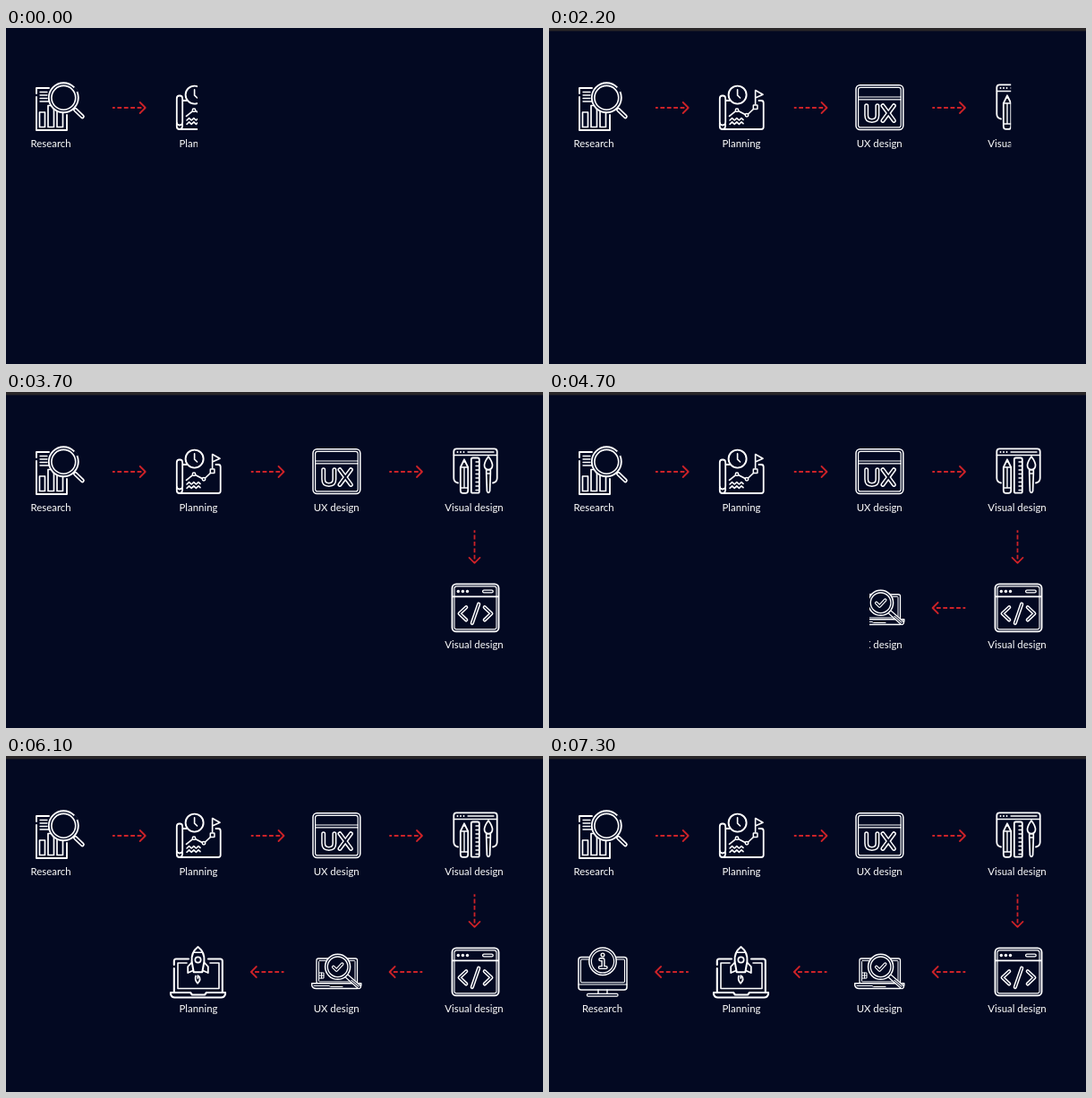
An HTML page with a canvas that plays this animation: 600x375 px, repeating every 8000 ms.

```html
<!DOCTYPE html>
<html lang="en">
<head>
<meta charset="utf-8">
<title>Design process</title>
<style>
  html, body { margin: 0; width: 100%; height: 100%; overflow: hidden; background: #030922; }
  canvas { display: block; width: 600px; height: 375px; }
</style>
</head>
<body>
<canvas id="stage"></canvas>
<script>
const W = 600, H = 375, LOOP = 8000;
const NAVY = '#030922', RED = '#cc2228', WHITE = '#fff';
const canvas = document.getElementById('stage');
const ctx = canvas.getContext('2d');
const dpr = window.devicePixelRatio || 1;
canvas.width = W * dpr;
canvas.height = H * dpr;

// Drawing helpers; paths use SVG syntax in stage pixels.
function stroke(d, width = 1.7, color = WHITE) {
  ctx.strokeStyle = color;
  ctx.lineWidth = width;
  ctx.stroke(new Path2D(d));
}
function fill(d, color = NAVY) {
  ctx.fillStyle = color;
  ctx.fill(new Path2D(d));
}
function shape(d, width) {
  fill(d);
  stroke(d, width);
}
function hollow(d, outer, inner) {
  stroke(d, outer);
  stroke(d, inner, NAVY);
}
function box(x, y, w, h, r, width = 1.7) {
  ctx.beginPath();
  ctx.roundRect(x, y, w, h, r);
  ctx.fillStyle = NAVY;
  ctx.fill();
  ctx.strokeStyle = WHITE;
  ctx.lineWidth = width;
  ctx.stroke();
}
function ring(x, y, r, width = 1.7) {
  ctx.beginPath();
  ctx.arc(x, y, r, 0, Math.PI * 2);
  ctx.fillStyle = NAVY;
  ctx.fill();
  ctx.strokeStyle = WHITE;
  ctx.lineWidth = width;
  ctx.stroke();
}
function dot(x, y, r) {
  ctx.beginPath();
  ctx.arc(x, y, r, 0, Math.PI * 2);
  ctx.fillStyle = WHITE;
  ctx.fill();
}
function label(text, x, baseline) {
  ctx.font = '11.4px Lato, "Open Sans", sans-serif';
  ctx.textAlign = 'center';
  ctx.fillStyle = WHITE;
  ctx.fillText(text, x, baseline);
}
function arrow(x, y, turns) {
  ctx.save();
  ctx.translate(x, y);
  ctx.rotate(turns * Math.PI / 2);
  ctx.lineCap = 'butt';
  ctx.setLineDash([4.8, 2.6]);
  ctx.lineDashOffset = 2;
  stroke('M0 0H36.5', 1.8, RED);
  ctx.setLineDash([]);
  ctx.lineCap = 'round';
  stroke('M30.7 -6L36.7 0L30.7 6', 1.8, RED);
  ctx.restore();
}

function chartIcon() {
  stroke('M34 73V67H48M34 77V114H68V97', 1.9);
  stroke('M38 71.5H46M38 75H46M38 78.5H46M38 82H48', 1.3);
  box(37.5, 94, 6, 16.5, 0);
  box(47, 86.5, 6.5, 24, 0);
  box(57, 92, 6.5, 18.5, 0);
  hollow('M77.5 91.3L85.3 98.8', 5, 1.6);
  ring(64.3, 77.8, 16.5, 1.9);
  ring(64.3, 77.8, 13.4, 1.6);
  stroke('M77 67.3L78.8 70.1', 2.6, NAVY);
}

function planIcon() {
  stroke('M197 81H202M234.5 81H237Q239.7 81 239.7 83.5V110.5Q239.7 113 237 113H194', 1.8);
  box(190.8, 75.5, 6.4, 33, 3.2, 1.8);
  stroke('M190.8 106V110Q190.8 113 194 113Q197.2 113 197.2 108', 1.8);
  ring(210.6, 74.6, 10, 1.9);
  stroke('M210.6 68.8V75.2L213.6 78', 1.6);
  stroke('M201.5 98.3L210 91.7L221 97.5L230 89');
  ring(210, 91.7, 1.7, 1.5);
  ring(221, 97.3, 1.7, 1.5);
  box(228.3, 86, 4.6, 4.6, .5, 1.5);
  stroke('M230.6 85V69.5L239 74.3L230.6 78', 1.6);
  for (const y of [103, 107.3])
    stroke(`M202 ${y}l2.6 -2.4l2.6 2.4l2.6 -2.4l2.6 2.4l2.6 -2.4l2 1.8`, 1.6);
}

function uxIcon() {
  box(343, 63.7, 52.8, 49.8, 4.5, 1.5);
  box(345.6, 66.3, 47.6, 44.6, 2.5, 1.2);
  stroke('M345.6 77H393.2M345.6 79.8H393.2', 1.2);
  hollow('M354.7 86.7V97.5Q354.7 103.4 360.8 103.4Q366.9 103.4 366.9 97.5V86.7', 5, 2);
  hollow('M373 86.7L385.4 103.4M385.4 86.7L373 103.4', 5, 2);
}

function toolsIcon() {
  stroke('M505 101.5Q500.3 100.5 500.3 96V66.5Q500.3 63.4 503.5 63.4H545.5Q548.7 63.4 548.7 66.5V96Q548.7 100.5 544 101.5', 1.8);
  stroke('M500.5 70.5H548.5', 1.5);
  for (const x of [504.5, 508, 511.5]) dot(x, 67, 1);
  stroke('M516 67H545', 1.3);
  shape('M507.8 84L512 75.3L516.2 84V110Q516.2 112.8 513.5 112.8H510.5Q507.8 112.8 507.8 110Z', 1.8);
  stroke('M508 84H516M508 107H516M512 85V106M511 78H513', 1.4);
  box(519.8, 73.5, 9, 39.2, 1.8, 1.8);
  for (let y = 78; y < 111; y += 4.5) stroke(`M525 ${y}H528`, 1.4);
  shape('M539 72Q533.8 79 534.6 83Q535.3 86.5 539 86.5Q542.7 86.5 543.4 83Q544.2 79 539 72Z', 1.7);
  shape('M536.7 87H541.3V91L540.6 110.5Q539 114.5 537.4 110.5L536.7 91Z', 1.7);
  stroke('M536.7 91H541.3', 1.3);
}

function codeIcon() {
  box(498.5, 214.4, 52, 53, 4.5, 1.9);
  box(501, 216.9, 47, 48, 2.5, 1.1);
  stroke('M499 228.4H550', 1.8);
  for (const x of [505.3, 510.4, 515.5]) dot(x, 222.5, 1.7);
  box(532.6, 221.1, 11.6, 2.8, 1.4, 1.3);
  hollow('M514.2 240.2L506.7 247.3L514.2 254.4', 4.2, 1.2);
  hollow('M528.2 236.7L520.8 258', 4.2, 1.2);
  hollow('M534.8 240.2L542.3 247.3L534.8 254.4', 4.2, 1.2);
}

function testIcon() {
  box(347, 226, 45.5, 28, 2, 1.3);
  box(349.5, 228.4, 40.5, 23.5, 1, 1);
  shape('M341.7 253.8H396.8V256Q396 259.5 392 259.5H346.5Q342.5 259.5 341.7 256Z', 1.4);
  stroke('M344 256.5H361L362.5 257.5H376', 1);
  stroke('M350 242H355V248H350ZM350 245H355M352.5 242V248', 1);
  hollow('M381.5 246.3L394.3 257.5', 5.2, 2.8);
  stroke('M386 250.3L394 257.2', 1.1);
  ring(370.6, 235.3, 14, 1.5);
  ring(370.6, 235.3, 11.3, 1.3);
  hollow('M365.8 235.5L369.3 239L375.6 232.2', 3.8, 1.5);
}

function launchIcon() {
  stroke('M204 226.5H190Q187.8 226.5 187.8 229V233M187.8 237V263.5M226 226.5H239.5Q241.8 226.5 241.8 229V263.5', 2.1);
  stroke('M202 231H192V259.5H238V231H228', 1.6);
  shape('M184 264H206L208 266.5H222L224 264H245V266Q244 269.5 240.5 269.5H188.5Q185 269.5 184 266Z', 2.1);
  shape('M208.5 229.5L203.2 235V242L209 239.5M220.5 229.5L225.8 235V242L220 239.5', 1.8);
  shape('M214.5 213Q206.6 219 207.6 229.5L209.7 241.3H219.3L221.4 229.5Q222.4 219 214.5 213Z', 2);
  stroke('M210 219.3H219', 1.4);
  ring(214.5, 227.5, 3.2, 1.7);
  stroke('M212 245.5Q210.5 249.5 214 253.8Q218.5 249 215.5 245.7M214.3 245V248', 1.7);
}

function infoIcon() {
  box(33, 224.5, 54, 36.5, 3, 1.5);
  box(35.5, 227, 49, 25.8, 1.2, 1.1);
  stroke('M33 255H87', 1.2);
  stroke('M55 261V266M65 261V266', 1.4);
  box(42.5, 265.3, 34.5, 2.8, 1.2, 1.2);
  ring(60, 229.3, 15.2, 1.5);
  ring(60, 229.3, 12.6, 1.2);
  ring(60, 222, 1.9, 1.3);
  hollow('M57.3 227.2H60.5V235.5M56.8 236H63.7', 4.2, 1.4);
}

const right = x => () => arrow(x, 89, 0);
const left = x => () => arrow(x, 241, 2);
const down = () => arrow(523.5, 154.2, 1);
const card = (icon, text, x, y) => () => { icon(); label(text, x, y); };

// Each reveal: [start ms, steps, from, to, vertical?, draw, step ms]
const reveals = [
  [-1000, 1, 20, 100, 0, card(chartIcon, 'Research', 50.1, 132.8)],
  [-1000, 1, 110, 160, 0, right(119)],
  [0, 2, 186, 242, 0, card(planIcon, 'Planning', 215, 132.8), 200],
  [600, 3, 272, 314, 0, right(273.8)],
  [1000, 4, 342, 398, 0, card(uxIcon, 'UX design', 369.2, 132.8)],
  [1600, 4, 427, 468, 0, right(428.3)],
  [2100, 5, 489, 557, 0, card(toolsIcon, 'Visual design', 523, 132.8)],
  [2800, 2, 151, 193, 1, down],
  [3200, 5, 212, 291, 1, card(codeIcon, 'Visual design', 523, 286)],
  [3900, 5, 468, 426, 0, left(465.3)],
  [4500, 4, 409, 341, 0, card(testIcon, 'UX design', 369.2, 286)],
  [5100, 4, 313, 271, 0, left(310.5)],
  [5700, 3, 248, 181, 0, card(launchIcon, 'Planning', 215, 286)],
  [6300, 4, 158, 116, 0, left(155.8)],
  [6900, 4, 92, 30, 0, card(infoIcon, 'Research', 59.5, 286)]
];

function progress(t, start, steps, stepMs = 100) {
  const k = Math.floor((t - start) / stepMs) + 1;
  return Math.max(0, Math.min(steps, k)) / steps;
}

function draw(t) {
  ctx.setTransform(dpr, 0, 0, dpr, 0, 0);
  ctx.lineCap = ctx.lineJoin = 'round';
  ctx.fillStyle = NAVY;
  ctx.fillRect(0, 0, W, H);

  ctx.globalAlpha = progress(t, 1000, 4);
  ctx.fillStyle = '#292628';
  ctx.fillRect(0, 0, W, 3.4);
  ctx.globalAlpha = 1;

  for (const [start, steps, from, to, vertical, paint, stepMs] of reveals) {
    const p = progress(t, start, steps, stepMs);
    if (!p) continue;
    const edge = from + (to - from) * p;
    const lo = Math.min(from, edge), size = Math.abs(edge - from);
    ctx.save();
    ctx.beginPath();
    if (vertical) ctx.rect(0, lo, W, size);
    else ctx.rect(lo, 0, size, H);
    ctx.clip();
    paint();
    ctx.restore();
  }
}

function tick() {
  draw(performance.now() % LOOP);
  requestAnimationFrame(tick);
}
tick();
</script>
</body>
</html>
```
